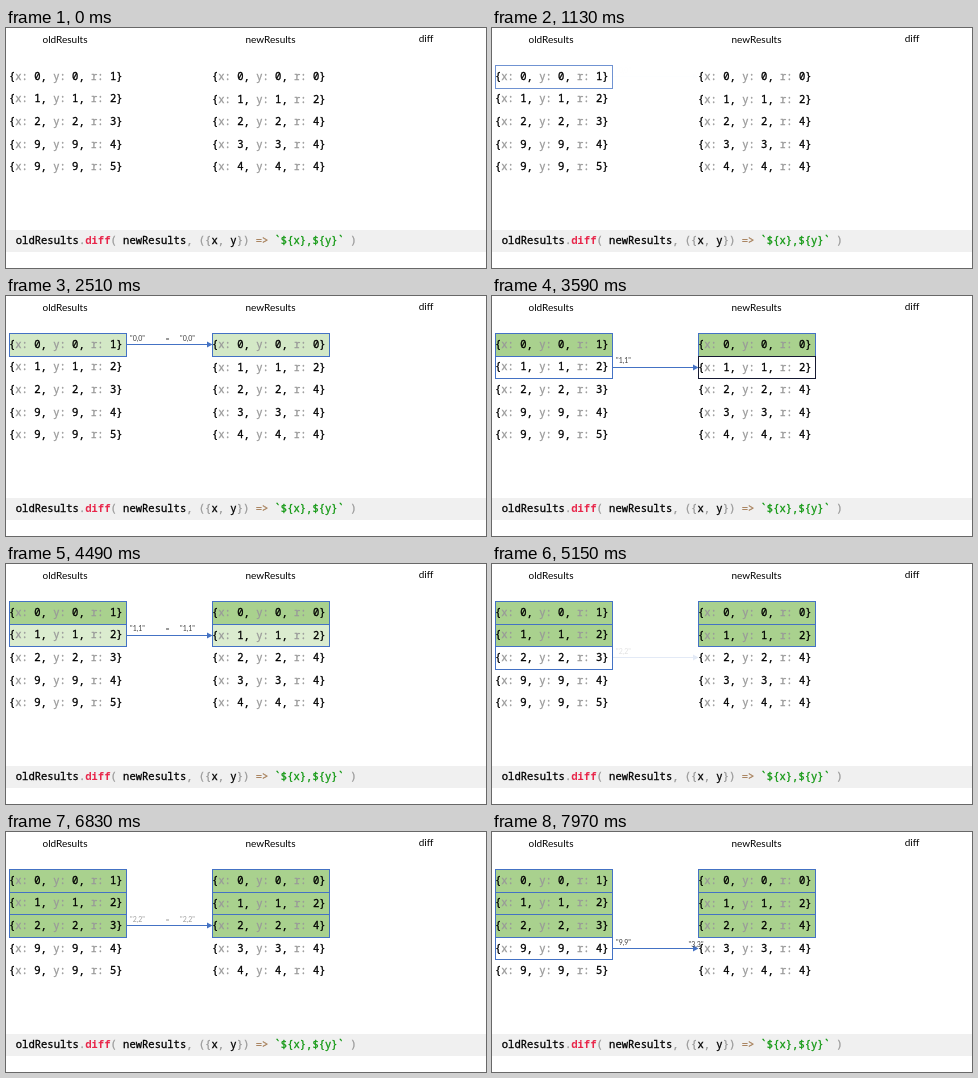
An HTML page for the animation above (8000 ms loop, 480x240 px).

```html
<!DOCTYPE html>
<html>
<head>
<meta charset="utf-8">
<style>
html, body { margin: 0; width: 100%; height: 100%; overflow: hidden; background: #fff; }
svg { display: block; }
text { white-space: pre; }
.head, .label { font-family: Lato, sans-serif; text-anchor: middle; }
.head { font-size: 10px; }
.label { font-size: 7px; fill: #404040; }
/* the thin stroke gives a medium weight */
.code { font: 10.53px "Noto Sans Mono", monospace; fill: #000; stroke: #000; stroke-width: .3px; }
.dim { fill: #999; stroke: #999; }
.fn { fill: #e8274b; stroke: none; font-weight: bold; }
.op { fill: #a67f59; stroke: #a67f59; }
.str { fill: #0f970f; stroke: #0f970f; }
.box { fill: #a9d18e; stroke: #4472c4; }
.arrow { fill: #4472c4; }
</style>
</head>
<body>
<svg id="stage" width="480" height="240" viewBox="0 0 480 240">
  <rect y="202" width="480" height="22" fill="#f0f0f0"/>
  <text class="head" x="59" y="15">oldResults</text>
  <text class="head" x="264.5" y="15">newResults</text>
  <text class="head" x="420" y="14">diff</text>
  <text class="code" x="9.8" y="216">oldResults<tspan class="dim">.</tspan><tspan class="fn">diff</tspan><tspan class="dim">(</tspan> newResults<tspan class="dim">, ({</tspan>x<tspan class="dim">,</tspan> y<tspan class="dim">})</tspan> <tspan class="op">=&gt;</tspan> <tspan class="str">`${x},${y}`</tspan> <tspan class="dim">)</tspan></text>
</svg>
<script>
const LOOP = 8000, FIRST = 1690, PERIOD = 2000, PITCH = 22.6;
const oldRows = [[0, 1], [1, 2], [2, 3], [9, 4], [9, 5]];
const newRows = [[0, 0], [1, 2], [2, 4], [3, 4], [4, 4]];
const stage = document.getElementById("stage");

function add(tag, attrs, content = "") {
  const el = document.createElementNS("http://www.w3.org/2000/svg", tag);
  for (const k in attrs) el.setAttribute(k, attrs[k]);
  el.innerHTML = content;
  return stage.appendChild(el);
}

const addBox = (x, i) => {
  const top = 37.5 + Math.round(PITCH * i);
  const height = 37.5 + Math.round(PITCH * (i + 1)) - top;
  return add("rect", { class: "box", x, y: top, width: 117, height });
};
const addLabel = (x, i, s) => add("text", { class: "label", x, y: 44.8 + PITCH * i }, s);

function addRecord(x, y, [v, r]) {
  const key = k => `<tspan class="dim">${k}:</tspan>`;
  add("text", { class: "code", x, y: Math.round(y) },
    `{${key("x")} ${v}, ${key("y")} ${v}, ${key("r")} ${r}}`);
}

// The fourth pair differs, so its right side gets no box.
const steps = [0, 1, 2, 3].map(i => {
  const y = 48 + Math.round(PITCH * i);
  return {
    oldBox: addBox(3.5, i),
    newBox: i < 3 ? addBox(206.5, i) : null,
    arrow: add("path", {
      class: "arrow",
      d: `M120.5 ${y}H201v-2.5L206.5 ${y + .5}l-5.5 3v-2.5H120.5Z`
    })
  };
});
oldRows.forEach((row, i) => addRecord(3, 51.8 + PITCH * i, row));
newRows.forEach((row, i) => addRecord(206, 52 + PITCH * i, row));
steps.forEach((s, i) => {
  s.oldKey = addLabel(131.5, i, `"${oldRows[i][0]},${oldRows[i][0]}"`);
  s.equals = addLabel(161.5, i, "=");
  s.newKey = addLabel(181.5, i, `"${newRows[i][0]},${newRows[i][0]}"`);
});

const ramp = (t, a, b) => Math.min(1, Math.max(0, (t - a) / (b - a)));
const mix = (a, b, p) => a + (b - a) * p;

function draw(time) {
  steps.forEach((s, i) => {
    const t = time - FIRST - PERIOD * i;
    const keysLeft = 1 - ramp(t, 1080, 1200);
    const arrowIn = ramp(t, -560, -420);
    const move = ramp(t, 0, 450);
    const fill = ramp(t, 700, 940);
    const tint = ramp(t, -60, 20);

    s.oldBox.style.opacity = ramp(t, -620, -540);
    s.oldBox.style.fillOpacity = fill;
    if (s.newBox) {
      s.newBox.style.opacity = ramp(t, -240, -120);
      s.newBox.style.fillOpacity = fill;
      s.newBox.style.stroke =
        `rgb(${mix(22, 68, tint)},${mix(26, 114, tint)},${mix(50, 196, tint)})`;
    }
    s.arrow.style.opacity = arrowIn * (1 - ramp(t, 1150, 1270));
    s.oldKey.style.opacity = arrowIn * keysLeft;
    s.equals.style.opacity = ramp(t, 480, 600) * keysLeft;
    s.newKey.style.opacity = ramp(t, -60, 50) * keysLeft;
    s.newKey.setAttribute("transform", `translate(${60 * (1 - move)} ${6.5 * (1 - move)})`);
  });
}

const start = performance.now();
function tick() {
  draw((performance.now() - start) % LOOP);
  requestAnimationFrame(tick);
}
tick();
</script>
</body>
</html>
```
